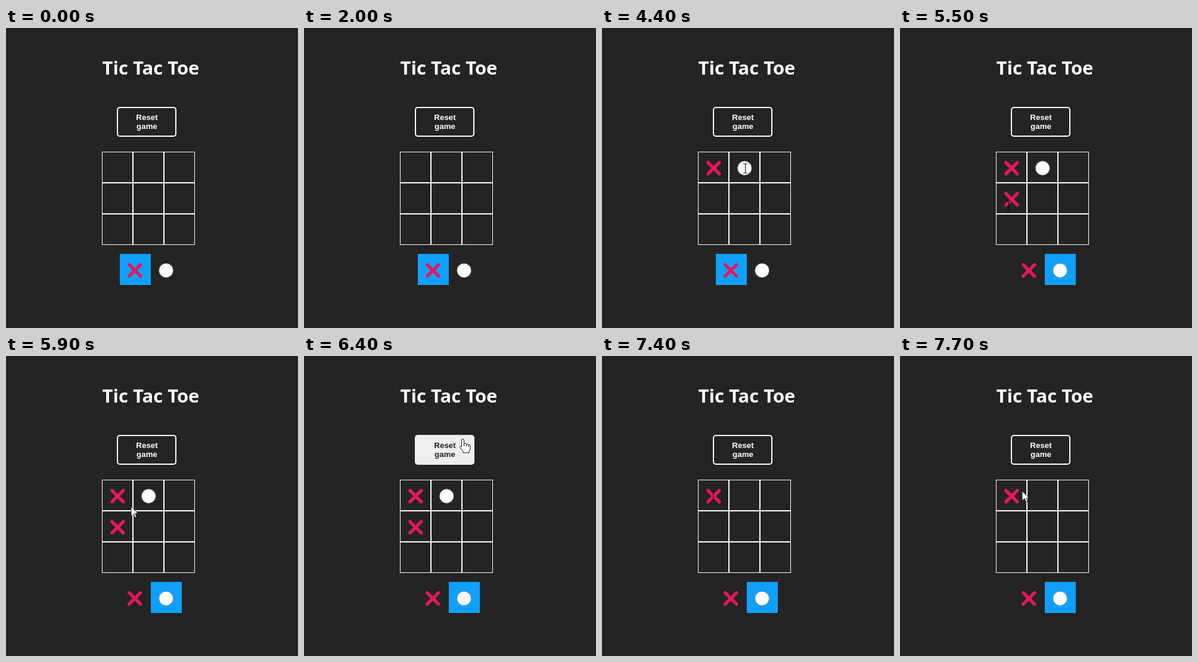
An HTML page for the animation above (8 s loop, 490 by 502 pixels).

```html
<!DOCTYPE html>
<html lang="en">
<head>
<meta charset="utf-8">
<title>Tic Tac Toe</title>
<style>
  html, body { margin: 0; width: 100%; height: 100%; overflow: hidden; background: #242424; }
  svg { display: block; width: 100%; height: 100%; }
  text { text-anchor: middle; fill: #fff; font-weight: 700; }
  .title { font: 700 31px "Open Sans", "Noto Sans", sans-serif; }
  .label text { font: 700 13.333px "Liberation Sans", Arial, sans-serif; fill: inherit; }
  .cell { fill: none; stroke: #fff; }
</style>
</head>
<body>
<svg viewBox="0 0 490 502">
  <defs>
    <path id="x" d="M-9.5 -9.5L9.5 9.5M9.5 -9.5L-9.5 9.5" fill="none" stroke="#e8175d" stroke-width="5.4" stroke-linecap="round"/>
    <circle id="o" r="11.8" fill="#fff" stroke="#8b8b8b" stroke-width=".8"/>
  </defs>
  <rect width="490" height="502" fill="#242424"/>
  <text class="title" x="243" y="78">Tic Tac Toe</text>
  <rect id="button" x="187" y="133" width="98" height="48" rx="4" stroke-width="2"/>
  <g id="label" class="label">
    <text x="236.5" y="154">Reset</text>
    <text x="236.5" y="169">game</text>
  </g>
  <g id="board"></g>
  <rect id="turn" y="378" width="52" height="52" fill="#0fa0ff"/>
  <use href="#x" x="216.2" y="405.7"/>
  <use href="#o" x="268.6" y="405.7"/>
  <use id="x0" href="#x" x="187.3" y="234.5"/>
  <use id="o1" href="#o" x="239.3" y="234.5"/>
  <use id="x3" href="#x" x="187.3" y="286.7"/>
  <g id="cursor" stroke-linejoin="round">
    <path id="arrow" d="M0 0V16L4 12.5L6.5 18.5L9 17.4L6.5 11.6H11.5Z" fill="#fff" stroke="#111" stroke-width=".8"/>
    <path id="beam" d="M-3.5 -8H-1L0 -7L1 -8H3.5M0 -7V7M-3.5 8H-1L0 7L1 8H3.5" fill="none" stroke="#000"/>
    <path id="hand" d="M-2.5 2Q-2.5 0 -.5 0T1.5 2V7.5Q4.5 6.5 5.5 8.5Q8 7.8 9 9.5Q12 9 12 12V16Q12 18 10 20V23H0V20.5Q-2 18 -5.5 13.5Q-5.5 11 -2.5 13ZM1.5 7.5V12M5.5 8.5V12M9 9.5V13" fill="#fff" stroke="#111"/>
  </g>
</svg>
<script>
  const LOOP = 8000, STEP = 100;
  const el = id => document.getElementById(id);
  const show = (id, on) => el(id).setAttribute('visibility', on ? 'visible' : 'hidden');
  const clamp = v => Math.max(0, Math.min(1, v));
  const mix = (a, b, u) => Math.round(a + (b - a) * u);
  const gray = v => `rgb(${v},${v},${v})`;

  for (let i = 0; i < 9; i++) {
    const r = document.createElementNS('http://www.w3.org/2000/svg', 'rect');
    const at = { class: 'cell', x: 161.5 + i % 3 * 52, y: 207.5 + Math.floor(i / 3) * 52, width: 51, height: 51 };
    for (const k in at) r.setAttribute(k, at[k]);
    el('board').append(r);
  }

  // time, x, y, pointer shape
  const path = [
    [2800, 2, 236, 'arrow'], [2900, 150, 230, 'arrow'], [3000, 183, 234, 'beam'],
    [3300, 183, 234, 'beam'], [3400, 227, 224, 'arrow'], [3900, 235, 227, 'arrow'],
    [4200, 235, 227, 'arrow'], [4300, 240, 235, 'beam'], [4800, 243, 235, 'beam'],
    [4900, 243, 235, 'beam'], [5000, 172, 281, 'arrow'], [5200, 172, 281, 'arrow'],
    [5300, 180, 293, 'beam'], [5500, 182, 297, 'beam'], [5700, 182, 297, 'beam'],
    [5800, 192, 283, 'arrow'], [6100, 246, 190, 'arrow'], [6200, 262, 158, 'hand'],
    [6400, 267, 139, 'hand'], [6700, 267, 139, 'hand'], [6800, 250, 168, 'hand'],
    [6900, 224, 200, 'arrow'], [7000, 204, 222, 'arrow'], [7200, 188, 229, 'arrow'],
    [7300, 188, 229, 'arrow'], [7400, 187, 234, 'beam'], [7600, 190, 232, 'beam'],
    [7700, 205, 226, 'arrow']
  ];

  function pointer(t) {
    const i = path.findLastIndex(k => k[0] <= t);
    if (i < 0) return null;
    const a = path[i], b = path[i + 1] || a;
    const u = a === b ? 0 : (t - a[0]) / (b[0] - a[0]);
    return { x: a[1] + (b[1] - a[1]) * u, y: a[2] + (b[2] - a[2]) * u, kind: a[3] };
  }

  function draw(time) {
    const t = Math.floor(time % LOOP / STEP) * STEP;
    const within = (a, b) => t >= a && t < b;

    show('x0', within(3000, 6500) || t >= 7400);
    show('o1', within(4300, 6500));
    show('x3', within(5300, 6500));
    const oTurn = within(3000, 4300) || within(5300, 6500) || t >= 7400;
    el('turn').setAttribute('x', oTurn ? 243 : 191);

    const hover = clamp((t - 6100) / 300) - clamp((t - 6700) / 300);
    el('button').setAttribute('fill', gray(mix(36, 238, hover)));
    el('button').setAttribute('stroke', gray(mix(255, 238, hover)));
    el('label').setAttribute('fill', gray(mix(255, 34, hover)));

    const p = pointer(t);
    for (const k of ['arrow', 'beam', 'hand']) show(k, p && p.kind === k);
    if (p) el('cursor').setAttribute('transform', `translate(${p.x} ${p.y})`);
  }

  const start = performance.now();
  function tick() {
    draw(performance.now() - start);
    requestAnimationFrame(tick);
  }
  tick();
</script>
</body>
</html>
```
